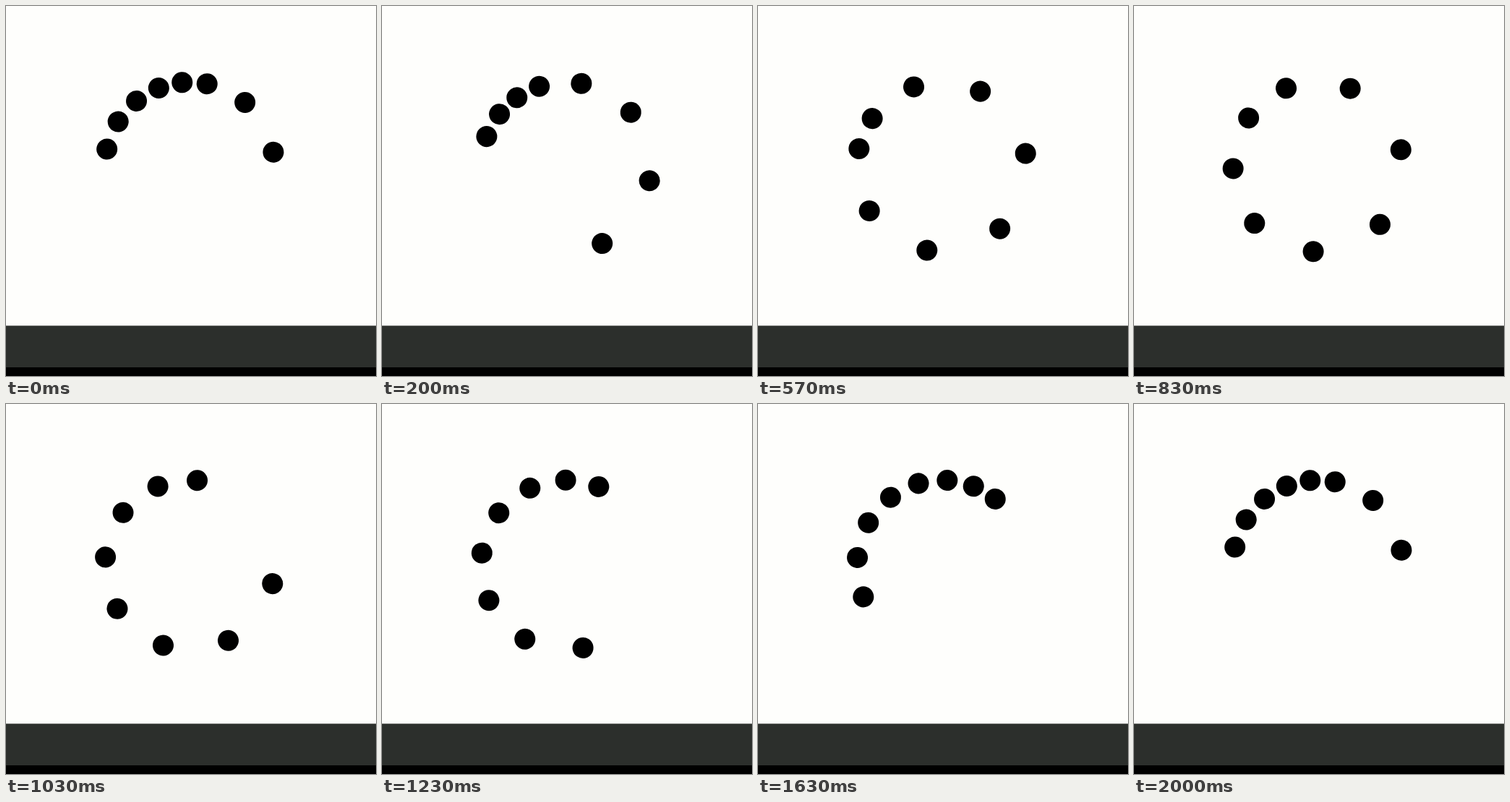
Animation of 512 by 512 pixels, one loop 2130 ms. Source, as an HTML page without scripts:

```html
<!DOCTYPE html>
<html lang="en">
<head>
<meta charset="utf-8">
<title>Dot spinner</title>
<style>
  @property --tick {
    syntax: "<number>";
    inherits: true;
    initial-value: 0;
  }

  html, body {
    margin: 0;
    width: 100%;
    height: 100%;
    overflow: hidden;
    background: #fefefc;
  }

  svg {
    display: block;
    width: 100%;
    height: 100%;
  }

  /* 60 ticks in two seconds, then a short rest */
  .ring {
    animation: tick 2130ms -4ms infinite;
  }

  @keyframes tick {
    0% { --tick: 0; animation-timing-function: steps(60, end); }
    93.897%, 100% { --tick: 60; }
  }

  /* Each dot eases through one turn; --s solves the "ease" Bezier for --x */
  .ring circle {
    --x: mod(var(--tick) / 60 + 0.11 - 0.05 * var(--i), 1);
    --h: calc((var(--x) - 0.15625) / 2);
    --a: pow(var(--h) + sqrt(var(--h) * var(--h) + 0.0065918), 1 / 3);
    --s: calc(0.25 + var(--a) - 0.1875 / var(--a));
    --ease: calc(var(--s) * (0.3 + var(--s) * (2.4 - 1.7 * var(--s))));
    transform-origin: 0 0;
    transform: rotate(calc((130.1 - 15 * var(--i) + 360 * var(--ease)) * 1deg));
  }
</style>
</head>
<body>
<svg viewBox="0 0 512 512">
  <rect width="512" height="512" fill="#fefefc"/>
  <rect y="442.4" width="512" height="57.6" fill="#2c2f2c"/>
  <rect y="500" width="512" height="12"/>
  <g transform="translate(254.4 222.6)">
    <g class="ring">
      <circle cx="-117.3" r="14.5" style="--i:0"/>
      <circle cx="-117.3" r="14.5" style="--i:1"/>
      <circle cx="-117.3" r="14.5" style="--i:2"/>
      <circle cx="-117.3" r="14.5" style="--i:3"/>
      <circle cx="-117.3" r="14.5" style="--i:4"/>
      <circle cx="-117.3" r="14.5" style="--i:5"/>
      <circle cx="-117.3" r="14.5" style="--i:6"/>
      <circle cx="-117.3" r="14.5" style="--i:7"/>
    </g>
  </g>
</svg>
</body>
</html>
```
